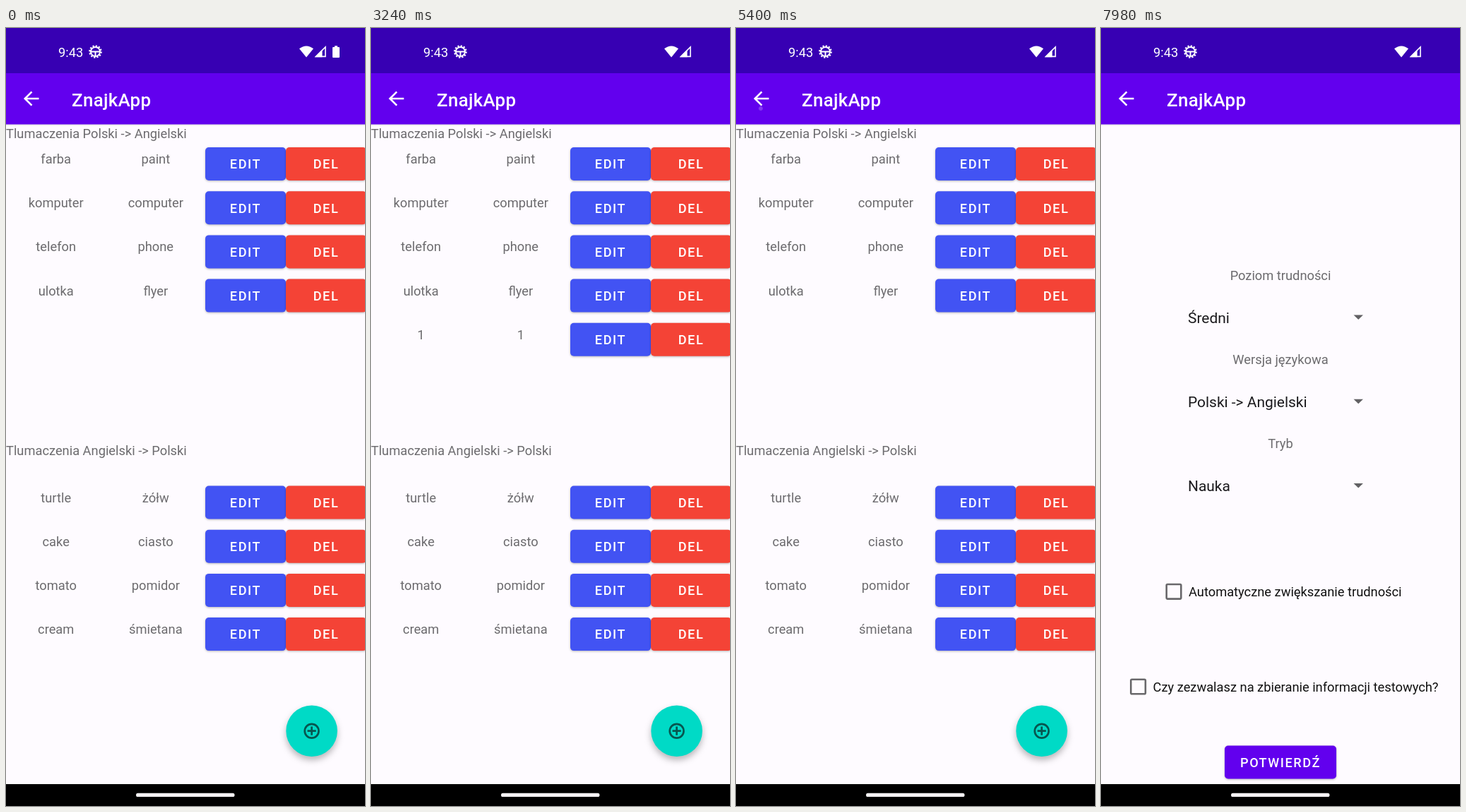
Write an HTML page that moves like this. It is 508x1102 px and loops after 8 s.

```html
<!DOCTYPE html>
<html lang="pl">
<head>
<meta charset="utf-8">
<title>ZnajkApp</title>
<style>
  html, body { margin: 0; width: 100%; height: 100%; overflow: hidden; background: #000; }
  svg { display: block; }
  text { font: 18.3px Roboto, sans-serif; fill: #6c6b6e; white-space: pre; }
  .mid { text-anchor: middle; }
  .dark { font-size: 20.95px; fill: #1b1a1d; }
  .small { fill: #111; }
  .field { font-size: 23.6px; }
  .title { font-size: 25.9px; font-weight: 500; letter-spacing: .32px; fill: #fff; }
  .label { font-size: 18.1px; font-weight: 500; letter-spacing: 1.62px; fill: #fff; text-anchor: middle; }
  .low { filter: drop-shadow(0 1.5px 1.5px rgba(0, 0, 0, .28)); }
  .high { filter: drop-shadow(0 5px 5px rgba(0, 0, 0, .28)); }
</style>
</head>
<body>
<svg id="stage" width="508" height="1102" viewBox="0 0 508 1102"></svg>
<script>
const LOOP = 8000, FADE = 180;
const TEAL = '#03dac5', PURPLE = '#6200ee', BLUE = '#4253f3', RED = '#f44336';
const stage = document.getElementById('stage');

const clamp = v => Math.max(0, Math.min(1, v));
const text = (x, y, s, cls = '') => `<text x="${x}" y="${y}" class="${cls}">${s}</text>`;
const rect = (x, y, w, h, fill, more = '') =>
  `<rect x="${x}" y="${y}" width="${w}" height="${h}" fill="${fill}" ${more}/>`;
const circle = (x, y, r, fill, more = '') =>
  `<circle cx="${x}" cy="${y}" r="${r}" fill="${fill}" ${more}/>`;
const path = (d, more) => `<path d="${d}" ${more}/>`;

// A touch ripple that grows quickly, then fades out.
function ripple(t, start, x, y, size) {
  const age = t - start;
  if (age <= 0 || age > 450) return '';
  const p = clamp(age / 300);
  const r = size * (1 - (1 - p) ** 2);
  return circle(x, y, r, 'url(#glow)', `opacity="${1 - clamp((age - 250) / 200)}"`);
}

// The nested svg clips the ripple to the button.
function button(x, y, w, h, label, fill = PURPLE, wave = '', raised = false) {
  return rect(x, y, w, h, fill, `rx="5" class="${raised ? 'high' : 'low'}"`) +
    `<svg x="${x}" y="${y}" width="${w}" height="${h}" viewBox="${x} ${y} ${w} ${h}">${wave}</svg>` +
    text(x + w / 2, y + h / 2 + 6.8, label, 'label');
}

function spinner(y, value, focused = false) {
  return (focused ? circle(364, y, 26, '#000', 'opacity=".31"') : '') +
    text(123, y + 8, value, 'dark') +
    path(`M357.5 ${y - 3}h13.4l-6.7 6.6z`, `fill="${focused ? '#444' : '#626164'}"`);
}

function field(y, hint, value, focused) {
  const line = y + 28;
  return `<text x="118" y="${y}" class="field" style="fill:${value ? '#1b1a1d' : '#6c6b6e'}">${value || hint}</text>` +
    rect(118, focused ? line - 1.2 : line - .8, 272, focused ? 2.8 : 1.5, focused ? TEAL : '#7d7b7f') +
    (focused ? rect(value ? 131 : 118, y - 25, 2.7, 32, TEAL) : '');
}

function checkbox(x, y, label) {
  return rect(x - 10.3, y - 10.3, 20.6, 20.6, 'none', 'rx="1.5" stroke="#69686b" stroke-width="2.6"') +
    text(x + 21, y + 7, label, 'small');
}

function page(content, back = true) {
  return rect(0, 0, 508, 1071, '#fefbff') + rect(0, 136, 508, 3, 'url(#edge)') +
    rect(0, 64, 508, 72.5, PURPLE) + rect(0, 0, 508, 64, '#3700b3') +
    (back ? path('M46.5 100H27.5M36.5 90.3L26.8 100L36.5 109.7', 'fill="none" stroke="#fff" stroke-width="2.6"') : '') +
    text(back ? 93 : 20.7, 110.5, 'ZnajkApp', 'title') + content;
}

const POLISH = [['farba', 'paint'], ['komputer', 'computer'], ['telefon', 'phone'], ['ulotka', 'flyer']];
const ENGLISH = [['turtle', 'żółw'], ['cake', 'ciasto'], ['tomato', 'pomidor'], ['cream', 'śmietana']];

function rows(list, top, t) {
  return list.map(([word, meaning], i) => {
    const y = top + i * 62.2, added = i === 4;
    return text(70.7, y + 23, word, 'mid') + text(211.8, y + 23, meaning, 'mid') +
      button(282, y, 114, 47, 'EDIT', BLUE, added ? ripple(t, 3300, 340, y + 24, 90) : '') +
      button(396, y, 114, 47, 'DEL', RED, added ? ripple(t, 4800, 453, y + 24, 90) : '');
  }).join('');
}

function listPage(t) {
  const added = t > 2000 && t < 4980;
  return page(
    text(0, 156, 'Tlumaczenia Polski -&gt; Angielski') +
    rows(added ? [...POLISH, ['1', '1']] : POLISH, 169, t) +
    text(0, 604.5, 'Tlumaczenia Angielski -&gt; Polski') +
    rows(ENGLISH, 648.5, t) +
    circle(432.6, 995.7, 36.3, '#00dac6', 'class="high"') +
    ripple(t, 200, 432.6, 995.7, 36) +
    circle(432.6, 995.7, 9.9, 'none', 'stroke="#07564f" stroke-width="2.7"') +
    path('M432.6 989.6v12.2M426.5 995.7h12.2', 'stroke="#07564f" stroke-width="2.7"') +
    ripple(t, 5389, 35, 114, 45));
}

function addPage(t) {
  const focus = t < 1500 ? 0 : t < 1920 ? 1 : 2;
  return page(
    field(451, 'Słowo', t < 1300 ? '' : '1', focus === 0) +
    field(558.5, 'Tłumaczenie', t < 1700 ? '' : '1', focus === 1) +
    spinner(657.5, 'Polski -&gt; Angielski', focus === 2) +
    button(113, 725.5, 282, 78.5, 'POTWIERDŹ', PURPLE, ripple(t, 2460, 254, 765, 160)));
}

function editPage(t) {
  const second = t >= 3960;
  return page(
    field(451, 'Słowo', '1', !second) +
    field(545.5, 'Tłumaczenie', '1', second) +
    button(113, 591.5, 282, 78.5, 'POTWIERDŹ', PURPLE, ripple(t, 4300, 254, 631, 160)), false);
}

function homePage(t) {
  const pressed = t > 5930;
  return page(
    rect(125, 266, 258, 258, '#000') +
    button(125, 662, 258, 62.5, 'TESTY', PURPLE, ripple(t, 5938, 250, 707, 140), pressed) +
    button(125, 766, 258, 62.5, 'SŁOWNIK'), false);
}

function testPage() {
  return page(
    text(254, 357, 'Poziom trudności', 'mid') + spinner(409.5, 'Średni') +
    text(254, 476, 'Wersja językowa', 'mid') + spinner(528.7, 'Polski -&gt; Angielski') +
    text(254, 595, 'Tryb', 'mid') + spinner(648, 'Nauka') +
    checkbox(103, 798.3, 'Automatyczne zwiększanie trudności') +
    checkbox(52.6, 933, 'Czy zezwalasz na zbieranie informacji testowych?') +
    button(175, 1016.5, 158, 47, 'POTWIERDŹ'));
}

const SCENES = [
  [-FADE, listPage], [480, addPage], [2640, listPage], [3480, editPage],
  [4440, listPage], [5580, homePage], [6180, testPage]
];

function statusBar(t) {
  return text(74, 40.5, '9:43').replace('class=""', 'style="fill:#fff"') +
    circle(126.5, 33.5, 6.5, 'none', 'stroke="#fff" stroke-width="2"') +
    circle(126.5, 33.5, 8.2, 'none', 'stroke="#fff" stroke-width="2.2" stroke-dasharray="2.3 1.99"') +
    path('M121 33.5h11M126.5 33.5v6', 'stroke="#fff" stroke-width="2"') +
    path('M425 41.5L415 29.3Q425 21.6 435 29.3z', 'fill="#fff"') +
    path('M438.5 40.4H452V27z', 'fill="none" stroke="#fff" stroke-width="1.6"') +
    path('M437 41.2L447.5 30.5V41.2z', 'fill="#fff"') +
    (t < 2640 ? path('M463 27h2v-1.8h4v1.8h2q1 0 1 1v13q0 1-1 1h-8q-1 0-1-1v-13q0-1 1-1z', 'fill="#fff"') : '');
}

const DEFS = `<defs>
  <radialGradient id="glow">
    <stop offset="0" stop-color="#fff" stop-opacity=".24"/>
    <stop offset=".7" stop-color="#fff" stop-opacity=".2"/>
    <stop offset="1" stop-color="#fff" stop-opacity="0"/>
  </radialGradient>
  <linearGradient id="edge" x2="0" y2="1">
    <stop offset="0" stop-opacity=".14"/><stop offset="1" stop-opacity="0"/>
  </linearGradient></defs>`;

function draw(now) {
  const t = now % LOOP;
  const i = SCENES.findLastIndex(([start]) => t >= start);
  const [start, scene] = SCENES[i];
  const shown = clamp((t - start) / FADE);
  const below = shown < 1 ? SCENES[i - 1][1](t) : '';
  const pill = t >= 1920 && t < 2640 ? '#565656' : '#f3f1f3';
  stage.innerHTML = DEFS + below + `<g opacity="${shown}">${scene(t)}</g>` + statusBar(t) +
    rect(0, 1071, 508, 31, '#000') + rect(184, 1083.8, 139.5, 5.2, pill, 'rx="2.6"');
}

const began = performance.now();
function tick() {
  draw(performance.now() - began);
  requestAnimationFrame(tick);
}
tick();
</script>
</body>
</html>
```
